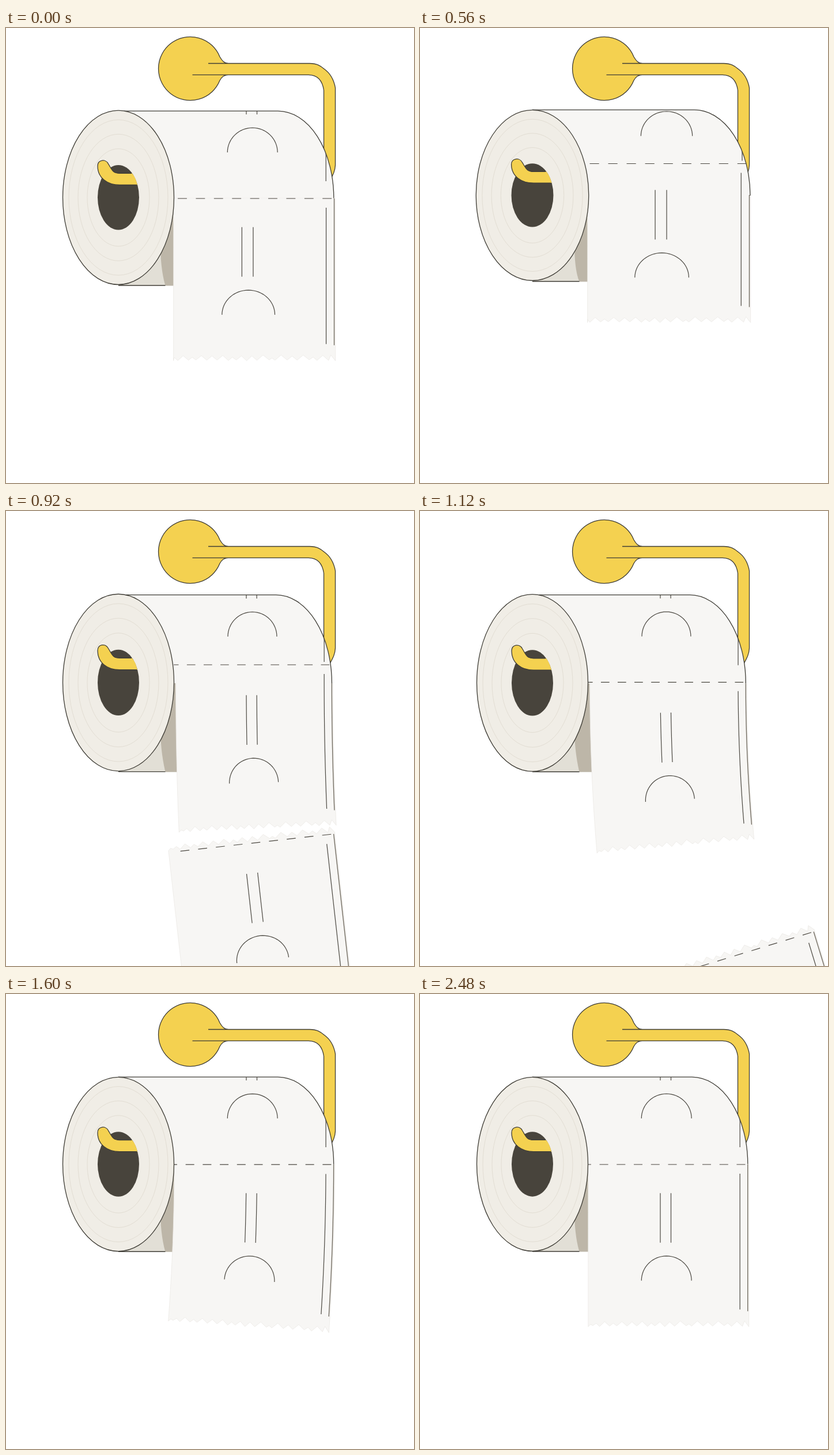
These frames come from a looping animation (708x790 px, 2520 ms). An HTML page:

```html
<!DOCTYPE html>
<html lang="en">
<head>
<meta charset="utf-8">
<title>Paper roll</title>
<style>
  html, body { margin: 0; width: 100%; height: 100%; overflow: hidden; background: #fff; }
  svg { display: block; width: 100vw; height: 100vh; }
  path, ellipse { fill: none; vector-effect: non-scaling-stroke; }
  .ink { stroke: #3f3d36; stroke-width: 1.3; }
  .thin { stroke: #4a4740; stroke-width: 1.2; }
  .edge { stroke: #6b655a; stroke-width: 1.3; }
  .gold { fill: #f4d150; }
  .paper { fill: #f7f6f4; }
  .sheet { fill: #f7f6f4; stroke: #ebe9e5; stroke-width: .8; }
  .ring { stroke: #e2ddd3; stroke-width: 1; }
  .face { fill: #f0ede6; }
  .hole { fill: #48443c; }
  .under { fill: #e2dfd6; }
  .shade { fill: #bdb6a8; }
</style>
</head>
<body>
<svg viewBox="0 0 708 790">
  <clipPath id="clip"><path id="clipShape"/></clipPath>

  <path class="gold ink" d="M387 62C379 61.5 375 57 371 50A55.2 55.2 0 1 0 371 91C375 84 379 81.5 387 81"/>
  <path class="gold" d="M351 61.5H527C540 61.5 546 66 552 71C562 78 569 90 571.5 104V238C571 248 568 254 562 265H551.5V108C549 91 540 81 525 81H351Z"/>
  <path class="ink" d="M351 61.5H527C540 61.5 546 66 552 71C562 78 569 90 571.5 104V238C571 248 568 254 562 265M323.5 81.3H525C540 81.5 549 91 551.5 108V230"/>

  <path id="under" class="under"/>
  <path id="shade" class="shade"/>
  <path id="body" class="paper"/>
  <path id="baseLine" class="ink"/>

  <g clip-path="url(#clip)">
    <path id="nextLines" class="thin"/>
    <path id="midSheet" class="sheet"/>
    <path id="midLines" class="thin"/>
    <path id="midEdge" class="edge"/>
    <path id="endSheet" class="sheet"/>
    <path id="endLines" class="thin"/>
    <path id="endEdge" class="edge"/>
  </g>
  <path id="topLine" class="ink"/>

  <g id="disc">
    <ellipse class="face ink" rx="96.5" ry="151.3"/>
    <ellipse class="ring" rx="86" ry="135"/>
    <ellipse class="ring" rx="70" ry="110"/>
    <ellipse class="ring" rx="54" ry="84.7"/>
    <ellipse class="hole" rx="36" ry="56.3"/>
    <path class="gold" d="M33 -21.8H2C-19 -21.8 -36 -34 -36 -54.5C-36 -66 -22 -67.5 -17.5 -58.5C-11 -48 -10 -42 2 -42H23.7Q30 -35 33 -21.8Z"/>
    <path class="ink" d="M32 -21.8H2C-19 -21.8 -36 -34 -36 -54.5C-36 -66 -22 -67.5 -17.5 -58.5C-11 -48 -10 -42 2 -42H23"/>
  </g>
</svg>
<script>
const LOOP = 2520, STEP = 40, TEAR = 880;
const SHEET = 282, LEFT = 292, RIGHT = 570.5;
const DASH = 15, PITCH = 29.7;
const $ = id => document.getElementById(id);
const draw = (id, d) => $(id).setAttribute('d', d);
const mix = (a, b, p) => a + (b - a) * p;
const ease = p => (1 - Math.cos(Math.PI * p)) / 2;

// eased value through [time, value] points
function key(t, ...pts) {
  if (t <= pts[0][0]) return pts[0][1];
  const i = pts.findIndex(p => p[0] > t);
  if (i < 0) return pts[pts.length - 1][1];
  const [t0, a] = pts[i - 1], [t1, b] = pts[i];
  return mix(a, b, ease((t - t0) / (t1 - t0)));
}

// torn edge: x and height above the sheet's end
const teeth = (() => {
  let seed = 7;
  const rnd = () => (seed = seed * 16807 % 2147483647) / 2147483647;
  const pts = [[LEFT, 0]];
  for (let x = LEFT; x < RIGHT - 24;) {
    const h = 4 + 6.5 * rnd();
    pts.push([x + h, h], [x + 2 * h, 2 * rnd()]);
    x += 2 * h;
  }
  return [...pts, [563, 10], [RIGHT, 0]];
})();

const line = (pts, map) =>
  'M' + pts.map(p => map(...p).map(n => n.toFixed(2)).join(' ')).join('L');

const vertical = (x, y0, y1) =>
  Array.from({ length: 11 }, (_, i) => [x, mix(y0, y1, i / 10)]);

// eyes and mouth; y is where the mouth's ends sit
function face(y, map) {
  const mouth = Array.from({ length: 33 }, (_, i) => {
    const a = Math.PI * i / 32;
    return [427.7 - 43.4 * Math.cos(a), y - 42.7 * Math.sin(a)];
  });
  const eye = x => line(vertical(x, y - 152, y - 66), map);
  return eye(417) + eye(435.5) + line(mouth, map);
}

function dashes(y, map, first) {
  let d = '';
  for (let x = first; x < 560; x += PITCH) d += line([[x, y], [x + DASH, y]], map);
  return d;
}

// sheet from y0 to y1; the side that joins the roll stays open
function outline(y0, y1, tornTop, tornEnd, map) {
  const end = tornEnd ? teeth.map(([x, h]) => [x, y1 - h]) : [];
  const top = tornTop ? teeth.map(([x, h]) => [x, y0 - 3 - h]).reverse() : [];
  return line([...vertical(LEFT, y0, y1), ...end, ...vertical(RIGHT, y1, y0), ...top], map) +
    (tornTop ? 'Z' : '');
}

function render(t) {
  const torn = t >= TEAR;

  // the whole roll squashes and stretches with one value
  const pull = key(t, [0, 0], [460, -7], [580, -7], [920, 5.6], [1040, 6], [1680, 0]);
  const drop = key(t, [560, 0], [1300, 1]);
  const top = 143.1 + .1 * pull + 1.2 * drop, bottom = 445.5 + pull + drop;
  const rx = 96.5 + .18 * Math.max(0, -pull);
  const cy = (top + bottom) / 2, ratio = (bottom - top) / 302.6;
  const lineY = 144.1 + .27 * pull, baseY = 447 + pull, right = 568.8 - .6 * pull;
  const hinge = (lineY + baseY) / 2;
  const long = Math.min(ratio, 1.01);

  const curve = `H${right - 97}A97 ${hinge - lineY} 0 0 1 ${right} ${hinge}`;
  draw('body', `M195 ${lineY}${curve}H195Z`);
  draw('under', `M195 ${hinge}H298V${baseY}H195Z`);
  draw('shade', `M268 375C268 400 270 425 276.5 ${baseY + .6}H298V${hinge}H285Z`);
  draw('baseLine', `M195 ${baseY}H276.5`);
  draw('topLine', `M195 ${lineY}${curve}`);
  draw('clipShape', `M291 ${lineY}${curve}H291ZM0 ${hinge}H708V790H0Z`);
  $('disc').setAttribute('transform', `translate(195 ${cy}) scale(${rx / 96.5} ${ratio})`);

  // paper below the hinge swings like a soft strip
  const bend = key(t, [600, 0], [920, .05], [1160, .09], [1640, -.075], [1960, .019], [2400, 0]);
  const hang = (x, y) => {
    const s = Math.max(0, y - hinge);
    return [x + bend * s * s / 560, y - bend * s / 280 * (x - 431)];
  };
  const wide = (right - 417) / 151.6;
  const midMap = (x, y) => hang(417 + (x - 417) * wide, y);

  // wind up, pull down, tear, settle
  const joint = t < 560
    ? key(t, [0, 296], [320, 220], [560, 235.5])
    : mix(235.5, 530, Math.min(1, (t - 560) / 320) ** 1.4);
  const seam = torn
    ? key(t, [TEAR, 248], [920, 267], [1160, 299.5], [1640, 296])
    : joint - SHEET * long;
  const midEnd = seam + SHEET * long;
  const gap = key(t, [0, 80], [320, 52], [560, 48], [720, 80]);
  const nextGap = t < 920 ? 49 : seam - key(t, [920, 218], [1680, 216]);
  const lineEnd = g => Math.max(5, g - 50);

  // sheet still on the roll
  draw('nextLines', face(seam - nextGap, midMap) +
    line(vertical(555, seam - 200, seam - lineEnd(nextGap)), midMap));

  // middle sheet
  const from = Math.max(hinge, seam);
  draw('midSheet', midEnd > hinge ? outline(hinge - 1, midEnd, false, torn, midMap) : '');
  draw('midLines', face(midEnd - gap, midMap) + dashes(seam, midMap, 282) +
    line(vertical(555, seam + 16, midEnd - lineEnd(gap)), midMap));
  draw('midEdge', midEnd - 27 > from ? line(vertical(568.5, from, midEnd - 27), midMap) : '');

  // last sheet: wider than the roll, hanging and then falling
  const scale = key(t, [0, 1.057], [560, 1.0786], [TEAR, 1.042]);
  const shift = key(t, [0, -31.4], [560, -41.7], [TEAR, -22.9]);
  const left = key(t, [600, 290.7], [TEAR, 281]);
  const turn = key(t, [TEAR, .075], [920, .112], [1160, .31]);
  const c = Math.cos(turn), s = Math.sin(turn), tau = t - 920;
  const fx = 424 + .3 * tau + .0015 * tau * tau;
  const fy = 577 + .8 * tau + .0009 * tau * tau;
  const endMap = torn
    ? (x, y) => {
        const u = x * scale + shift - 424;
        return [fx + u * c + y * s, fy - u * s + y * c];
      }
    : (x, y) => hang(Math.max(left, x * scale + shift), y);
  const y = torn ? 0 : joint;
  const start = torn ? 0 : Math.max(hinge - 1, y);
  const end = y + SHEET * long;
  const gone = t > 1240;
  draw('endSheet', gone ? '' : outline(start, end, torn, true, endMap));
  draw('endLines', gone ? '' : face(end - 80 * long, endMap) +
    dashes(y, endMap, 282 + PITCH) +
    line(vertical(555.3, y + 16, end - 29), endMap));
  draw('endEdge', gone ? '' : line(vertical(568.5, start, end - 27), endMap));
}

function tick() {
  const t = performance.now() % LOOP;
  render(Math.floor(t / STEP) * STEP);
  requestAnimationFrame(tick);
}
render(0);
requestAnimationFrame(tick);
</script>
</body>
</html>
```
